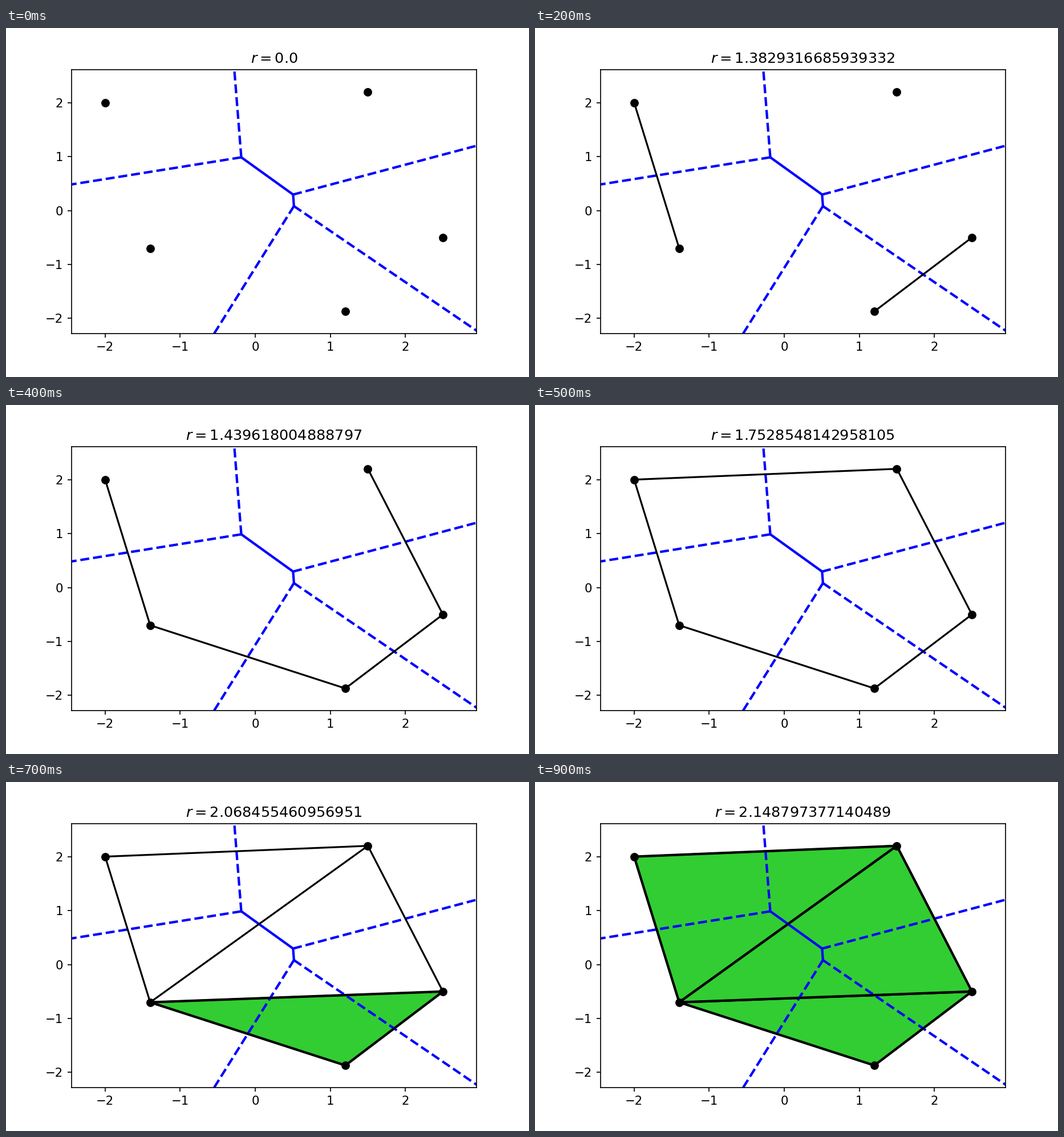
Animation, 917 px wide and 611 px high, one loop 1000 ms. Source, as a matplotlib script:

```python
import math

import matplotlib.pyplot as plt
import numpy as np
from matplotlib.animation import FuncAnimation
from matplotlib.collections import LineCollection

WIDTH, HEIGHT = 917, 611
DPI = WIDTH / 6

POINTS = np.array([(-2, 2), (-1.4, -0.7), (1.2, -1.87), (2.5, -0.5), (1.5, 2.2)])
EXTENT = np.ptp(POINTS, axis=0)
# Each Delaunay triangle with the hull edges its unbounded Voronoi rays cross
TRIANGLES = {
    (0, 1, 4): [(0, 1), (0, 4)],
    (1, 3, 4): [(3, 4)],
    (1, 2, 3): [(1, 2), (2, 3)],
}


def half_length(i, j):
    return math.sqrt(sum((POINTS[i] - POINTS[j]) ** 2)) / 2


# Alpha filtration: radius, edges and triangles born at each step
STEPS = [
    (0.0, [], []),
    (half_length(2, 3), [(2, 3)], []),
    (1.3829316685939332, [(0, 1)], []),
    (half_length(1, 2), [(1, 2)], []),
    (1.439618004888797, [(3, 4)], []),
    (half_length(0, 4), [(0, 4)], []),
    (2.0506096654409878, [(1, 4)], []),
    (2.068455460956951, [(1, 3)], [(1, 2, 3)]),
    (2.0776755129687805, [], [(0, 1, 4)]),
    (2.148797377140489, [], [(1, 3, 4)]),
]


def circumcenter(triangle):
    a, b, c = POINTS[list(triangle)]
    sides = np.array([b - a, c - a])
    return a + np.linalg.solve(2 * sides, (sides ** 2).sum(axis=1))


def ray(center, edge):
    """Segment from a Voronoi vertex outwards, perpendicular to a hull edge."""
    p, q = POINTS[list(edge)]
    tangent = (q - p) / np.linalg.norm(q - p)
    normal = np.array([-tangent[1], tangent[0]])
    outward = np.sign(np.dot((p + q) / 2 - POINTS.mean(axis=0), normal)) * normal
    return [center, center + outward * EXTENT.max()]


fig, ax = plt.subplots(figsize=(WIDTH / DPI, HEIGHT / DPI), dpi=DPI)
fig.subplots_adjust(left=0.125, right=0.9, bottom=0.125, top=0.88)
ax.set_xlim(POINTS[:, 0].min() - 0.1 * EXTENT[0], POINTS[:, 0].max() + 0.1 * EXTENT[0])
ax.set_ylim(POINTS[:, 1].min() - 0.1 * EXTENT[1], POINTS[:, 1].max() + 0.1 * EXTENT[1])
title = ax.set_title("", fontsize=12)

centers = {triangle: circumcenter(triangle) for triangle in TRIANGLES}
vertices = list(centers.values())
rays = [ray(centers[t], edge) for t, edges in TRIANGLES.items() for edge in edges]
ax.add_collection(LineCollection([vertices[:2], vertices[1:]],
                                 colors="blue", lw=2, linestyle="solid"))
ax.add_collection(LineCollection(rays, colors="blue", lw=2, linestyle="dashed"))

# Artists paired with the step at which they appear
simplices = []
for step, (_, edges, triangles) in enumerate(STEPS):
    for edge in edges:
        line, = ax.plot(*POINTS[list(edge)].T, color="black", lw=1.5)
        simplices.append((step, line))
    for triangle in triangles:
        patch, = ax.fill(*POINTS[list(triangle)].T, facecolor="limegreen",
                         edgecolor="black", lw=2)
        simplices.append((step, patch))
ax.plot(*POINTS.T, "o", color="black", markersize=6)


def update(frame):
    title.set_text(f"$r = {STEPS[frame][0]}$")
    for birth, artist in simplices:
        artist.set_visible(birth <= frame)
    return [title] + [artist for _, artist in simplices]


animation = FuncAnimation(fig, update, frames=len(STEPS), interval=100,
                          repeat=True, repeat_delay=0)
plt.show()
```
